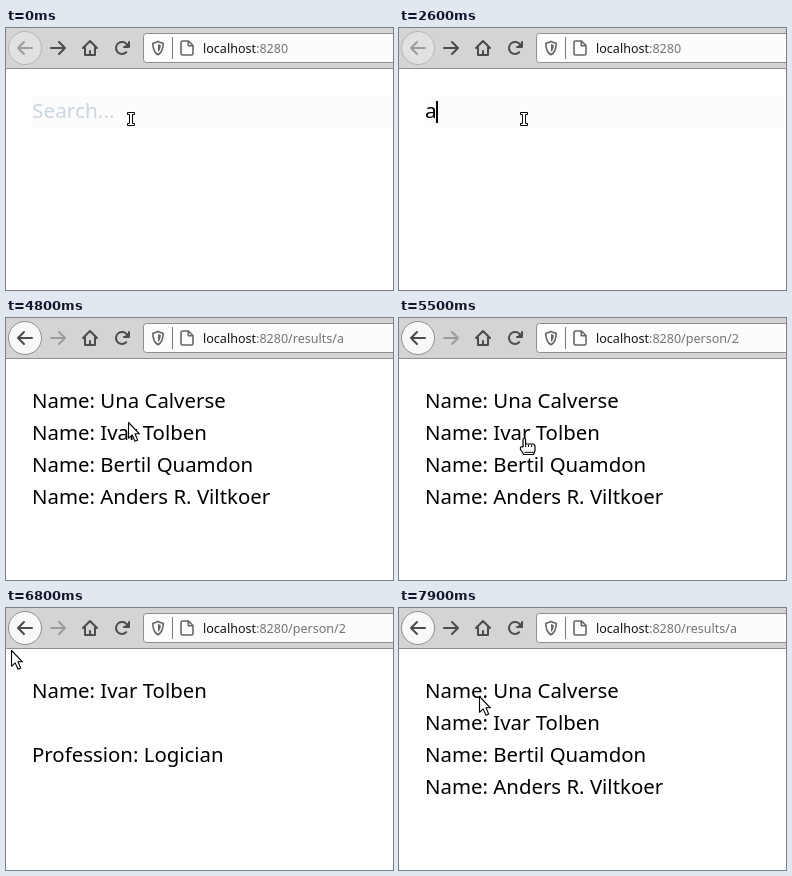
An HTML page for the animation above (8000 ms loop, 387 px wide and 262 px high).

```html
<!DOCTYPE html>
<html lang="en">
<head>
<meta charset="utf-8">
<title>Search demo</title>
<style>
  html, body { margin: 0; height: 100%; overflow: hidden; background: #fff; }
  svg { display: block; width: 100vw; height: 100vh; }
  text { font-family: "Noto Sans", "Open Sans", sans-serif; white-space: pre; }
  #page text { font-size: 20.4px; }
  #page #query { font-size: 20.8px; }
  #url { font-size: 12.55px; fill: #737373; }
  .icon { fill: none; stroke: #4c4c4c; stroke-width: 2; stroke-linecap: round; stroke-linejoin: round; }
  .off { stroke: #9c9c9c; }
  .thin { stroke: #666; stroke-width: 1.6; }
</style>
</head>
<body>
<svg viewBox="0 0 387 262">
  <rect width="387" height="262" fill="#fff"/>
  <rect width="387" height="40" fill="#d4d4d4"/>
  <rect y="40" width="387" height="1" fill="#8e8e8e"/>

  <circle id="ring" cx="19" cy="20" r="16.5"/>
  <path id="back" class="icon" d="M26 20H12M18 14 12 20 18 26"/>
  <path id="forward" class="icon" d="M45 20H59M53 14 59 20 53 26"/>
  <path class="icon" d="M77 20 84 13 91 20M79 19.5V27H89V19.5M84 27V23"/>
  <path class="icon" d="M120.2 24.2A6 6 0 1 1 121.2 17M123 14V19H118"/>
  <path d="M123 14V19H118Z" fill="#4c4c4c"/>

  <rect x="137.5" y="5.5" width="260" height="29" rx="3" fill="#fcfcfc" stroke="#8e8e8e"/>
  <path class="icon thin" d="M152 13.3C150.5 14.5 148.5 15 146.8 15.2 146.8 20.5 148 24.5 152 26.8 156 24.5 157.2 20.5 157.2 15.2 155.5 15 153.5 14.5 152 13.3Z"/>
  <path d="M152 16V24C154 22.5 154.8 20 154.8 17Q153 16.7 152 16Z" fill="#666"/>
  <rect x="166" y="9" width="1" height="22" fill="#777"/>
  <path class="icon thin" d="M176.5 13H182.5L187 17.5V25.5Q187 27 185.5 27H176.5Q175 27 175 25.5V14.5Q175 13 176.5 13ZM182.3 13.3V17.7H186.8"/>
  <text id="url" x="197" y="25"><tspan fill="#141414">localhost</tspan><tspan>:8280</tspan><tspan id="route"></tspan></text>

  <g id="page">
    <g id="search">
      <rect x="26" y="68" width="361" height="32" fill="#fcfcfc"/>
      <text id="query" x="26" y="90"></text>
      <rect id="caret" y="73" width="2" height="22"/>
    </g>
    <g id="results"></g>
    <g id="person"></g>
  </g>

  <g id="cursor" stroke="#000" fill="#fff" stroke-linejoin="round">
    <g id="beam">
      <path d="M-3.5-6.5H3.5V-4.5H1.5V4.5H3.5V6.5H-3.5V4.5H-1.5V-4.5H-3.5Z" stroke="#fff" stroke-width="3"/>
      <path d="M-3.5-6.5H3.5V-4.5H1.5V4.5H3.5V6.5H-3.5V4.5H-1.5V-4.5H-3.5Z"/>
    </g>
    <g id="hand">
      <path stroke-width="1.2" d="M-3 8V.8Q-3-.5-1.7-.5T-.4.8V5H6.8Q9 5.2 9 7.5V11.5L7.5 15.5H-2.2L-5.5 10.5Q-6.2 8.4-4.8 7.8-3.8 7.4-3 8Z"/>
      <path fill="none" d="M-.4 5V8M2.6 5.5V8M5.6 5.5V8M-1.5 13.3H7.5"/>
    </g>
    <path id="arrow" stroke-width="1.1" d="M.5.5V16.3L4.2 12.9 7 19.3 9.7 18.1 7 11.8H11.5Z"/>
  </g>
</svg>
<script>
const $ = id => document.getElementById(id);
const LOOP = 8000;
const people = ["Una Calverse", "Ivar Tolben", "Bertil Quamdon", "Anders R. Viltkoer"];

// time, x, y, shape
const pointer = [
  [0, 125, 91, "beam"], [3600, 124, 88, "hand"], [4400, 141, 84, "hand"],
  [4600, 138, 87, "hand"], [4700, 129, 95, "hand"], [4800, 122, 104, "arrow"],
  [4900, 124, 113, "hand"], [5000, 127, 121, "hand"], [6000, 127, 121, "arrow"],
  [6600, 75, 88, "arrow"], [6700, 0, 50, "arrow"], [6800, 5, 42, "arrow"],
  [7100, 8, 37, "arrow"], [7200, 14, 28, "arrow"], [7300, 17, 24, "arrow"],
  [7800, 48, 55, "arrow"], [7900, 80, 88, "arrow"]
];
const routes = [[0, ""], [3500, "/results/a"], [5500, "/person/2"], [7500, "/results/a"]];
const views = [[0, "search"], [3600, "results"], [6000, "person"], [7500, "results"]];

const at = (steps, t) => steps.findLast(step => step[0] <= t);
const within = (t, from, to) => t >= from && t < to;
const show = (id, visible) => { $(id).style.display = visible ? "" : "none"; };
const showOnly = (ids, chosen) => ids.forEach(id => show(id, id === chosen));
const row = (label, i) => `<text x="26" y="${90 + 32 * i}">${label}</text>`;

$("results").innerHTML = people.map((name, i) => row("Name: " + name, i)).join("");
$("person").innerHTML = row("Name: " + people[1], 0) + row("Profession: Logician", 2);

function drawToolbar(t) {
  const canGoBack = t >= 3500;
  const canGoForward = !within(t, 3500, 7500);
  const pressed = within(t, 7400, 7500), hovered = within(t, 7200, 7400);
  $("ring").setAttribute("fill", pressed ? "#b5b5b5" : hovered ? "#d8d8d8" : canGoBack ? "#f8f8f8" : "#e1e1e1");
  $("ring").setAttribute("stroke", canGoBack ? "#8e8e8e" : "#b5b5b5");
  $("back").classList.toggle("off", !canGoBack);
  $("forward").classList.toggle("off", !canGoForward);
  $("route").textContent = at(routes, t)[1];
}

function drawPage(t) {
  const typed = t >= 2600;
  showOnly(["search", "results", "person"], at(views, t)[1]);
  $("query").textContent = typed ? "a" : "Search...";
  $("query").setAttribute("fill", typed ? "#000" : "#cbd5e0");
  $("caret").setAttribute("x", typed ? 37 : 26);
  show("caret", within(t, 300, 1500) || within(t, 2600, 2700));
}

function drawPointer(t) {
  const [, x, y, shape] = at(pointer, t);
  $("cursor").setAttribute("transform", `translate(${x} ${y})`);
  showOnly(["beam", "hand", "arrow"], shape);
}

function frame() {
  const t = performance.now() % LOOP;
  drawToolbar(t);
  drawPage(t);
  drawPointer(t);
  requestAnimationFrame(frame);
}
frame();
</script>
</body>
</html>
```
